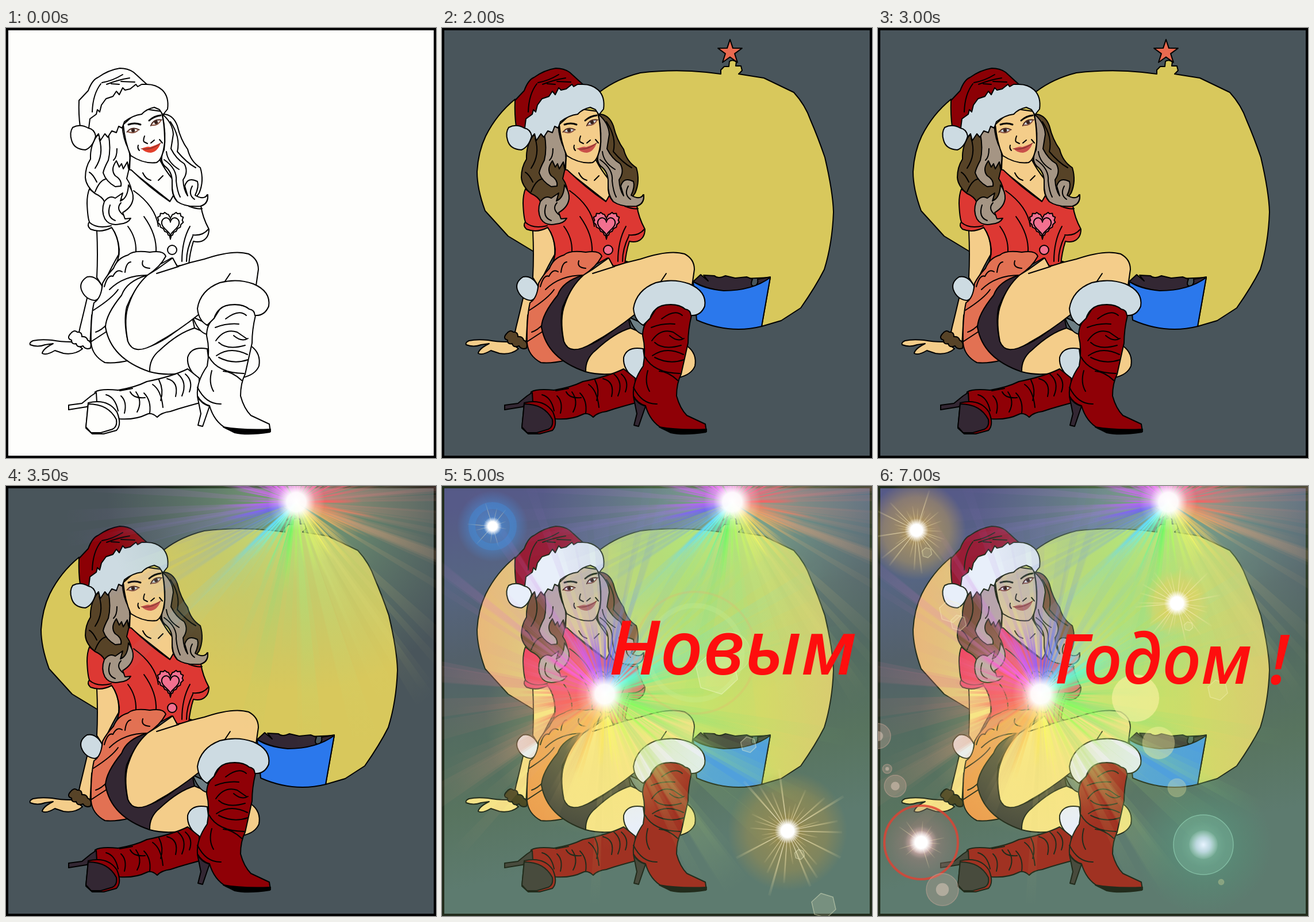
Write an HTML page with a canvas that moves like this. It is 748x748 px and loops after 8000 ms.

```html
<!DOCTYPE html>
<html lang="ru">
<head>
<meta charset="utf-8">
<title>С Новым Годом!</title>
<style>
html, body { margin: 0; width: 100%; height: 100%; overflow: hidden; background: #fefefc; }
canvas, svg { position: absolute; left: 0; top: 0; width: 748px; height: 748px; }
text { font: italic 600 130px "Open Sans", "Noto Sans", sans-serif; fill: #fe0e0e; }
</style>
</head>
<body>
<canvas id="stage" width="748" height="748"></canvas>
<svg viewBox="0 0 748 748"><text id="word"></text></svg>
<script>
const ctx = document.getElementById('stage').getContext('2d');
const word = document.getElementById('word');
const TAU = Math.PI * 2;

function addStops(g, stops) {
  stops.forEach((c, i) => g.addColorStop(i / (stops.length - 1), c));
  return g;
}
const fade = (x, y, r, ...stops) => addStops(ctx.createRadialGradient(x, y, 0, x, y, r), stops);
const ramp = (x0, y0, x1, y1, ...stops) => addStops(ctx.createLinearGradient(x0, y0, x1, y1), stops);

const keys = 'bg hat fur hair lock skin shirt heart skirt short boot cuff sack star pot shade lip ink'.split(' ');
const palette = list => Object.fromEntries(list.split(' ').map((c, i) => [keys[i], c]));
const W = '#fefefc';
const looks = {
  line: palette(Array(16).fill(W).join(' ') + ' #e2402c #000'),
  dark: palette('#49555b #8c0005 #cddbe2 #574327 #a59584 #f4cd8a #dd3833 #f27090 #e27153 #332733 #8f0006 #574327 #d8c85c #ea6a50 #2b78ec #6d7f85 #c9504a #000'),
  light: palette('#7d8892 #fd0000 #ffffff #a4683f #faf3d8 #fefcdf #ff5a50 #f78fc8 #eb9a60 #573a50 #fd0000 #7a4a2c #faf98c #f9dc9c #66e0ff #8a9698 #f0705c #000'),
  glow: palette('#56706c #981c34 #e8effa #7c5440 #b8a4ac #f6e488 #ee4166 #f0587c #eca050 #484b3d #a03222 #4c4a24 #dcd878 #f0e0a0 #50a0dc #6f8a78 #b06a5c #222c1c')
};
Object.assign(looks.glow, {
  bg: ramp(200, 0, 330, 640, '#565a88', '#566582', '#53606a', '#536c60', '#58745f', '#5d7b6f'),
  skin: ramp(0, 150, 0, 350, '#cfc2a6', '#dccb9c', '#f6e488'),
  sack: ramp(60, 250, 680, 250, '#e9b87a', '#dccb82', '#c4dc78', '#bfe46c', '#d3da68', '#d8cc70')
});

// start, look, sack, bursts, word, flares, wink
const steps = [
  [0, 'line', 0, 0, 0, 0, 0],
  [1000, 'dark', 0, 0, 0, 0, 0],
  [2000, 'dark', 1, 0, 0, 0, 0],
  [2500, 'light', 1, 0, 0, 0, 0],
  [3000, 'dark', 1, 0, 0, 0, 0],
  [3500, 'dark', 1, 1, 0, 0, 0],
  [4000, 'glow', 1, 2, 0, 0, 0],
  [4500, 'glow', 1, 2, 1, 0, 0],
  [5000, 'glow', 1, 2, 2, 1, 0],
  [5500, 'glow', 1, 2, 3, 2, 0],
  [6000, 'glow', 1, 2, 3, 2, 1],
  [7000, 'glow', 1, 2, 3, 2, 0]
];
const words = [['', 0, 0, 130], ['С', 430, 335, 130], ['Новым', 290, 328, 130], ['Годом !', 307, 344, 119]];

const sack = new Path2D('M158,388 L115,362 L75,318 Q61,280 61,250 Q63,215 76,188 Q95,150 127,124 L220,150 L276,110 Q305,88 345,78 Q405,71 460,77 L485,80 L485,73 L491,67 L499,67 L500,58 Q506,54 512,59 L511,66 L520,66 L522,74 L516,80 L560,87 L612,112 Q632,134 641,160 Q654,190 666,225 Q680,285 681,320 Q679,375 665,420 Q650,450 624,487 L590,509 L556,519 L571,434 L437,440 L300,400 Z');
const pot = new Path2D('M437,441 Q455,454 490,457 Q540,457 571,434 L556,519 Q500,533 443,508 Z');
const potIn = new Path2D('M437,441 L450,429 L463,440 L455,430 L474,431 Q480,437 493,431 L510,435 L530,433 L540,437 Q535,449 543,449 Q551,447 549,437 L571,433 Q555,455 505,458 Q465,457 437,441 Z');

const figure = [
  // left arm and hand
  ['M141,470 Q134,500 129,520 L126,534 L146,552 L149,500 L163,470 Z', 'skin'],
  ['M113,546 Q95,546 80,543 Q60,541 47,544 Q40,547 42,551 Q55,556 68,551 L82,549 Q64,558 63,566 Q70,570 85,561 L100,566 Q120,569 133,558 Q122,548 113,546 Z', 'skin'],
  ['M112,532 Q118,524 124,529 Q132,528 132,537 Q140,536 142,543 Q150,546 147,557 Q138,560 134,553 Q124,557 122,549 Q114,551 114,543 Q105,540 112,532 Z', 'cuff'],
  ['M158,352 L184,347 Q198,368 196,394 Q184,415 176,432 L167,448 L158,434 Q160,395 158,352 Z', 'skin'],
  ['M167,449 Q157,430 141,433 Q127,442 131,455 Q137,472 155,474 Q167,470 167,449 Z', 'fur'],
  // neck and blouse
  ['M216,222 L268,230 Q276,246 289,262 L292,290 L286,302 L215,246 Z', 'skin'],
  ['M238,252 Q243,263 252,265 M265,265 L273,257'],
  ['M145,280 L155,288 L212,246 L218,247 Q250,278 285,302 L292,290 Q315,306 339,309 Q342,330 353,350 Q353,366 340,371 Q333,373 326,371 Q320,390 318,411 L298,414 L288,400 L270,410 L186,420 Q198,402 197,385 Q195,362 184,347 Q165,357 147,350 Q140,344 145,337 Q142,330 141,305 Q141,290 145,280 Z', 'shirt'],
  ['M145,338 Q158,350 183,344 M222,283 Q260,310 265,345 M240,328 Q263,360 261,391 M212,345 Q227,365 226,389 M320,345 Q306,370 306,406 M325,362 Q314,384 314,406 M352,350 Q342,362 325,360 M318,310 Q334,316 341,314'],
  // skirt and shorts
  ['M187,418 Q194,400 212,395 Q222,386 250,390 Q274,386 278,397 Q268,416 246,430 Q222,436 205,462 Q178,495 173,520 Q180,555 215,578 Q190,584 172,582 Q150,570 148,548 Q147,505 153,478 Q166,470 168,444 Q174,432 187,418 Z', 'skirt'],
  ['M171,450 Q177,428 186,432 Q193,418 202,424 M180,455 Q205,430 246,430 M207,425 Q209,408 217,407 M238,405 Q234,417 250,418 M152,491 Q185,470 195,455 M156,529 Q177,522 196,485 M149,545 L175,528'],
  ['M246,430 Q210,440 201,465 Q174,498 173,520 Q182,575 250,598 L268,562 Q300,532 328,522 L324,503 Q285,540 255,552 Q225,564 212,545 Q204,510 210,485 Q222,455 246,430 Z', 'short'],
  // legs
  ['M250,598 Q249,575 268,560 Q300,530 328,522 L352,532 L352,590 Q320,602 290,602 Q268,603 250,598 Z', 'skin'],
  ['M426,553 Q444,566 440,588 Q434,603 412,608 Z', 'skin'],
  ['M325,503 L352,515 L350,533 Q335,530 325,503 Z', 'shade'],
  ['M350,558 Q322,553 316,573 Q314,595 338,612 L354,588 Z', 'fur'],
  ['M246,430 L262,420 L290,400 L298,415 Q322,407 345,402 Q395,385 422,393 Q439,402 439,420 L434,455 L337,497 Q300,527 262,548 Q222,572 212,545 Q204,505 214,480 Q224,450 246,430 Z', 'skin'],
  ['M262,427 L300,415 M378,445 L390,427'],
  // lying boot
  ['M155,633 Q165,627 195,630 Q225,625 245,615 Q290,606 316,593 L336,609 L337,652 Q300,662 286,667 Q270,669 263,677 Q253,668 245,672 Q225,682 197,680 Q184,655 152,652 Z', 'boot'],
  ['M174,638 Q190,642 195,666 M200,640 Q211,650 206,670 M216,633 Q222,645 242,643 M226,633 Q238,650 228,668 M240,635 Q253,648 250,670 M255,620 Q270,630 273,660 M266,612 Q275,630 269,648 M280,610 Q301,615 295,641 M299,602 Q316,616 306,640 M312,602 Q326,614 319,633 M198,631 L220,627'],
  ['M109,656 L132,653 L148,640 L157,634 L158,651 L140,659 L109,664 Z', 'short'],
  ['M143,652 Q177,644 193,668 Q202,690 192,700 L170,706 L150,706 L139,696 Z', 'boot'],
  ['M143,654 Q178,654 192,681 Q194,694 185,698 L165,704 L148,704 L139,694 Z', 'short'],
  // standing boot
  ['M372,489 Q379,481 398,481 Q416,482 424,489 Q436,489 434,500 Q428,525 428,548 L422,575 L416,602 Q408,618 408,640 Q414,662 426,674 L458,689 L460,702 Q420,706 384,697 Q362,685 354,657 Q340,653 333,640 Q331,615 350,588 Q355,560 349,535 Q349,515 362,505 Z', 'boot'],
  ['M382,506 Q405,488 418,500 M364,521 Q385,513 405,515 M365,544 Q380,522 402,529 L418,540 M370,547 Q385,561 416,552 M396,535 Q410,547 421,540 M366,570 Q390,553 420,568 M370,573 Q395,586 421,577 M353,572 Q368,600 414,601 M358,596 Q352,617 361,632 M378,597 Q394,598 410,613 M333,625 Q348,655 374,654'],
  ['M333,641 Q340,654 354,658 L342,693 L334,691 L339,671 Z', 'short'],
  ['M378,694 Q410,700 460,698 L459,703 Q420,709 398,704 Z', 'ink'],
  ['M333,488 Q338,456 372,443 Q402,435 430,445 Q461,458 457,484 Q450,501 433,500 Q432,490 423,489 Q414,481 398,481 Q380,481 372,489 Q365,495 362,505 L350,517 Q335,509 333,488 Z', 'fur'],
  // hair
  ['M158,188 Q146,205 147,228 Q138,242 138,260 Q139,275 155,288 Q168,294 171,302 L220,296 Q219,274 210,262 Q218,235 214,205 L203,168 L172,180 Z', 'hair'],
  ['M178,184 L202,168 Q204,195 213,210 Q218,225 213,244 L211,233 L204,245 L201,236 L197,242 L192,231 Q181,246 190,257 Q202,264 200,275 L190,276 Q174,267 169,252 Q170,245 178,230 Q183,210 178,184 Z', 'lock'],
  ['M171,302 Q180,290 190,296 L203,287 L199,301 Q212,296 213,273 Q222,285 221,297 Q219,312 203,321 L207,332 L217,331 Q212,340 198,341 Q180,345 172,332 Q165,318 171,302 Z', 'lock'],
  ['M162,192 Q171,220 155,244 M145,251 Q151,254 158,268 M181,308 Q174,329 190,335 M193,210 Q193,225 187,230 M200,304 Q190,315 205,326 M155,285 Q163,265 173,263'],
  ['M272,150 Q290,149 298,170 Q304,195 316,211 Q321,232 338,243 Q345,266 336,287 L331,294 Q345,299 350,290 Q353,304 341,309 Q315,312 298,302 Q286,290 290,266 Q287,247 275,240 Q265,230 275,212 Z', 'hair'],
  ['M272,150 Q290,165 291,185 L287,210 Q296,228 310,236 Q318,250 308,264 Q309,282 316,292 L311,275 Q316,258 333,267 Q336,276 329,291 Q344,300 351,290 Q352,306 338,310 Q312,312 298,302 Q288,290 289,270 Q290,250 276,240 Q266,230 275,212 Q279,185 272,150 Z', 'lock'],
  ['M286,163 Q304,190 298,215 Q315,235 330,243 M279,215 Q281,234 301,246 M275,229 Q298,245 296,266 Q298,285 303,294 M324,275 Q316,290 328,298'],
  // face and hat
  ['M204,168 L235,140 L270,145 Q276,165 276,198 Q273,228 262,234 Q240,237 217,222 Q207,200 204,168 Z', 'skin'],
  ['M241,188 Q237,198 242,199 L246,201 M252,200 L258,195 M230,204 Q228,209 232,213 M267,194 L272,200'],
  ['M143,175 L129,172 Q126,150 127,126 L143,109 Q150,90 160,86 Q178,73 198,70 Q212,70 222,77 L245,98 L150,176 Z', 'hat'],
  ['M167,95 Q185,92 203,81 M175,98 Q195,90 215,87 M150,146 Q151,115 165,97 M183,97 L197,98 M200,93 L224,94'],
  ['M245,98 L236,98 L229,102 L226,98 L216,106 L207,108 L203,104 L197,116 L192,110 L186,119 L174,123 L166,134 L163,146 L159,142 L157,150 L146,158 L144,174 L156,190 L161,184 L164,196 L172,184 L177,190 L184,179 L192,182 L196,171 L202,174 L206,163 Q220,152 236,150 Q244,141 258,138 L267,142 L273,151 L281,141 Q284,120 272,108 Q261,98 245,98 Z', 'fur'],
  ['M156,188 Q154,176 143,174 Q129,166 116,173 Q110,182 114,195 Q118,211 138,212 Q151,207 156,188 Z', 'fur']
].map(([d, key]) => [new Path2D(d), key]);

function polygon(n, at) {
  const p = new Path2D();
  for (let i = 0; i < n; i++) p.lineTo(...at(i));
  p.closePath();
  return p;
}
const circle = (x, y, r) => { const p = new Path2D(); p.arc(x, y, r, 0, TAU); return p; };
const hexagon = (x, y, r) => polygon(6, i => [x + r * Math.cos(i * TAU / 6 + .3), y + r * Math.sin(i * TAU / 6 + .3)]);
const star = polygon(10, i => {
  const a = i * TAU / 10 - TAU / 4, r = i % 2 ? 8.5 : 22;
  return [501 + r * Math.cos(a), 42 + r * Math.sin(a)];
});
const heart = (n, cy, sx, sy, notch) => polygon(n, i => {
  const a = i / n * TAU, k = i % 2 ? notch : 1;
  const y = 13 * Math.cos(a) - 5 * Math.cos(2 * a) - 2 * Math.cos(3 * a) - Math.cos(4 * a);
  return [286 + k * sx * 16 * Math.sin(a) ** 3, cy - k * sy * y];
});
const frill = heart(44, 340, 1.44, 1.62, .89), innerHeart = heart(60, 343, .95, 1.07, 1);

function random(seed) {
  return () => {
    seed = (seed * 1664525 + 1013904223) >>> 0;
    return seed / 4294967296;
  };
}

function fill(p, c) { ctx.fillStyle = c; ctx.fill(p); }
function line(p, c, w = 2) { ctx.strokeStyle = c; ctx.lineWidth = w; ctx.stroke(p); }
function shape(p, c, ink) { fill(p, c); line(p, ink); }
function glow(x, y, r, ...stops) { fill(circle(x, y, r), fade(x, y, r, ...stops)); }

function ray(x, y, a, w, len, color) {
  const p = polygon(3, i => i ? [x + len * Math.cos(a + (i - 1.5) * w), y + len * Math.sin(a + (i - 1.5) * w)] : [x, y]);
  fill(p, color);
}

function burst(x, y, hues, seed) {
  const rnd = random(seed);
  for (let i = 0; i < 380; i++) {
    const wide = i < 110, turn = rnd() * 4, q = Math.floor(turn);
    const hue = hues[q] + (hues[q + 1] - hues[q]) * (turn - q);
    const len = wide ? 170 + 280 * rnd() : 50 + 110 * rnd() ** 1.5;
    const hsl = a => `hsla(${hue},${wide ? 65 : 95}%,68%,${a})`;
    ray(x, y, turn * TAU / 4, wide ? .03 + .09 * rnd() : .02 + .04 * rnd(), len,
      fade(x, y, len, hsl(wide ? .34 : .85), hsl(wide ? .13 : .55), hsl(0)));
  }
  glow(x, y, 50, '#fff', 'rgba(255,255,255,.95)', 'rgba(255,255,255,.25)', 'rgba(255,255,255,0)');
}

function sparkle(x, y, rgb, halo, reach, n, core) {
  const c = a => `rgba(${rgb},${a})`, rnd = random(x + y);
  glow(x, y, halo, c(.85), c(.5), c(.36), c(0));
  for (let i = 0; i < n; i++) {
    const len = reach * (.35 + .65 * rnd());
    ray(x, y, (i + rnd() * .6) / n * TAU, .04, len, fade(x, y, len, '#fff', 'rgba(255,240,185,.5)', 'rgba(255,235,170,.05)'));
  }
  glow(x, y, core * 1.6, '#fff', '#fff', 'rgba(255,255,255,0)');
}

function ghost(p, rgb, a, edge = .4) {
  fill(p, `rgba(${rgb},${a})`);
  line(p, `rgba(${rgb},${edge})`, 1.5);
}

function flares(set) {
  if (set === 1) {
    sparkle(88, 70, '70,150,230', 62, 45, 12, 10);
    line(circle(88, 70, 36), 'rgba(60,150,235,.3)', 12);
    sparkle(601, 600, '185,150,65', 104, 118, 32, 14);
    line(circle(440, 290, 106), 'rgba(235,170,110,.22)', 4);
    line(circle(440, 290, 82), 'rgba(200,240,150,.25)', 9);
    ghost(circle(500, 290, 36), '255,250,190', .12, .2);
    for (const [x, y, r] of [[478, 325, 38], [533, 450, 14], [664, 730, 22], [622, 641, 9]])
      ghost(hexagon(x, y, r), '250,250,210', .16);
    return;
  }
  sparkle(67, 77, '225,180,75', 86, 82, 32, 13);
  sparkle(520, 204, '245,205,90', 58, 78, 28, 14);
  glow(75, 620, 64, 'rgba(255,210,210,.8)', 'rgba(180,130,130,.4)', 'rgba(150,120,115,.25)');
  sparkle(75, 620, '240,190,190', 28, 50, 16, 13);
  line(circle(75, 620, 64), 'rgba(225,65,50,.8)', 4);
  glow(566, 624, 120, 'rgba(150,220,190,.6)', 'rgba(85,170,135,.35)', 'rgba(80,160,125,.2)', 'rgba(80,160,125,0)');
  ghost(circle(566, 624, 52), '150,215,185', .22, .6);
  glow(566, 624, 25, '#e8f4ff', 'rgba(205,225,240,.8)', 'rgba(200,230,225,.1)');
  for (const [x, y, r] of [[591, 355, 18], [126, 218, 20], [140, 238, 14], [540, 244, 8], [85, 116, 9]])
    ghost(hexagon(x, y, r), '250,245,190', .12);
  for (const [x, y, r, a] of [[448, 369, 41, .6], [488, 447, 28, .4], [520, 525, 16, .28], [597, 689, 5, .28]])
    ghost(circle(x, y, r), '255,243,165', a, .12);
  for (const [x, y, r] of [[30, 522, 19], [0, 435, 22], [112, 702, 28], [16, 492, 8]]) {
    ghost(circle(x, y, r), '220,175,160', .28);
    fill(circle(x, y, r * .4), 'rgba(250,220,205,.4)');
  }
}

function eyes({ ink, fur, lip }, wink) {
  line(new Path2D('M213,168 Q224,164 234,168 M249,161 Q258,153 269,152'), ink, 3);
  [[221, 178, -.1], [261, 164, -.4]].forEach(([x, y, tilt], i) => {
    ctx.save();
    ctx.translate(x, y);
    ctx.rotate(tilt);
    if (wink && !i) {
      line(new Path2D('M-11,0 Q0,7 11,0 M-9,2 L-12,5 M-4,4 L-6,8'), ink);
    } else {
      fill(new Path2D('M-11,2 Q-2,-9 11,0 Q1,9 -11,2 Z'), '#8a5544');
      fill(new Path2D('M-8,1 Q0,-5 8,0 Q0,5 -8,1 Z'), fur);
      fill(circle(0, 0, 3.2), '#37211c');
      line(new Path2D('M-11,2 Q-2,-8 11,0'), '#4a2b24', 1.6);
    }
    ctx.restore();
  });
  fill(new Path2D('M235,210 Q246,205 251,207 Q260,204 269,200 Q264,215 252,217 Q242,217 236,210 Z'), lip);
  line(new Path2D('M235,210 Q254,213 269,200'), '#7a302c', 1.2);
}

function halos() {
  const rings = [[595, 155, 400, .15], [540, 215, 205, .2], [525, 230, 175, .3], [512, 247, 160, .45], [503, 258, 148, .5], [500, 260, 135, .97]];
  fill(circle(610, 120, 595), 'rgba(190,210,215,.12)');
  for (const r of [595, 612]) line(circle(610, 120, r), 'rgba(190,205,215,.3)', 5);
  for (const [x, y, r, a] of rings) fill(circle(x, y, r), `rgba(255,255,255,${a})`);
}

function draw([, name, hasSack, bursts, text, flareSet, wink]) {
  const look = looks[name], ink = look.ink;
  ctx.lineJoin = ctx.lineCap = 'round';
  ctx.fillStyle = look.bg;
  ctx.fillRect(0, 0, 748, 748);
  if (hasSack) {
    fill(sack, look.sack);
    if (name === 'light') halos();
    line(sack, ink);
    shape(potIn, look.short, ink);
    shape(pot, look.pot, ink);
    shape(star, look.star, ink);
  }
  for (const [p, key] of figure) {
    if (key) fill(p, look[key]);
    line(p, ink);
  }
  for (const p of [frill, innerHeart, circle(289, 386, 8)]) shape(p, look.heart, ink);
  eyes(look, wink);
  ctx.strokeStyle = ink;
  ctx.lineWidth = 8;
  ctx.strokeRect(0, 0, 748, 748);
  if (bursts) {
    glow(505, 28, 330, 'rgba(180,250,150,.55)', 'rgba(150,210,140,.28)', 'rgba(140,190,140,0)');
    burst(505, 28, [0, 95, 280, 310, 360], 7);
  }
  if (bursts > 1) {
    glow(283, 400, 210, 'rgba(255,245,130,.5)', 'rgba(250,235,120,.2)', 'rgba(250,235,120,0)');
    burst(283, 362, [120, 55, -5, -110, -240], 23);
  }
  if (flareSet) flares(flareSet);

  const [str, x, y, size] = words[text];
  word.textContent = str;
  word.setAttribute('x', x);
  word.setAttribute('y', y);
  word.style.fontSize = size + 'px';
}

let shown;
const start = performance.now();
function tick(now) {
  const t = Math.max(0, now - start) % 8000;
  const step = steps.findLast(s => s[0] <= t);
  if (step !== shown) draw(shown = step);
  requestAnimationFrame(tick);
}
draw(shown = steps[0]);
requestAnimationFrame(tick);
</script>
</body>
</html>
```
